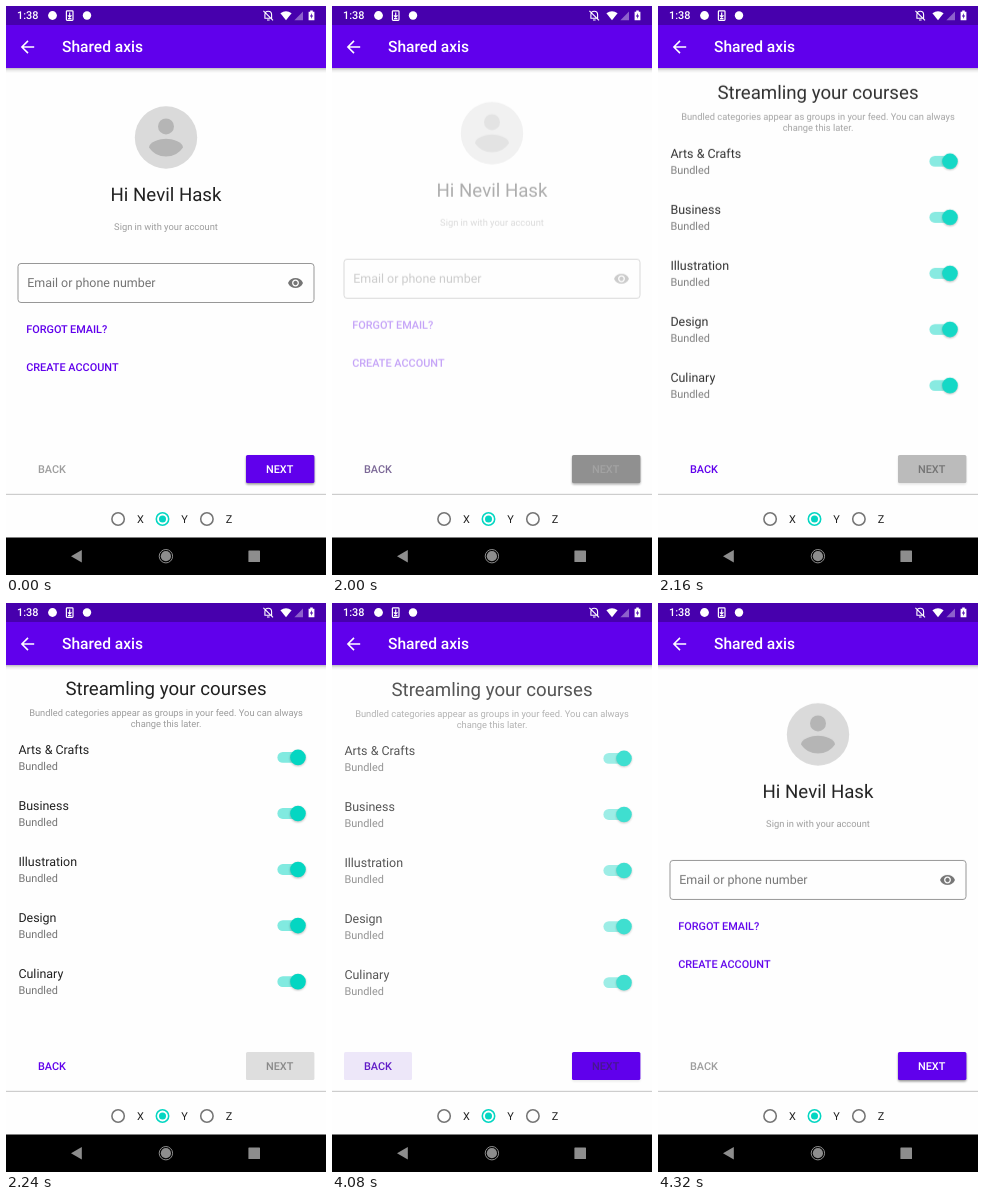
Recreate the animation shown at these times as an HTML page. Size 320 by 569 pixels, loop 4360 ms.

```html
<!DOCTYPE html>
<html lang="en">
<head>
<meta charset="utf-8">
<title>Shared axis transition</title>
<style>
  html, body { margin: 0; width: 100%; height: 100%; overflow: hidden; background: #fefefe; }
  svg { display: block; width: 100vw; height: 100vh; }
  text { font-family: Roboto, sans-serif; text-rendering: geometricPrecision; }
  .headline { font-size: 18.68px; fill: #212121; text-anchor: middle; }
  .caption { font-size: 9.34px; fill: #9c9c9c; text-anchor: middle; }
  .item { font-size: 12.46px; fill: #212121; }
  .sub { font-size: 10.9px; fill: #757575; }
  .button { font-size: 10.9px; font-weight: 500; }
  .link { fill: #6000ec; }
  .center { text-anchor: middle; }
</style>
</head>
<body>
<svg viewBox="0 0 320 569" preserveAspectRatio="none">
  <defs>
    <linearGradient id="barShade" x2="0" y2="1">
      <stop offset="0" stop-opacity=".26"/>
      <stop offset=".45" stop-opacity=".08"/>
      <stop offset="1" stop-opacity="0"/>
    </linearGradient>
    <filter id="soft" x="-20%" y="-40%" width="140%" height="180%"><feGaussianBlur stdDeviation="1.2"/></filter>
    <g id="toggle">
      <rect x="-20.6" y="-5.45" width="25.7" height="10.9" rx="5.45" fill="#04d6c2" opacity=".5"/>
      <circle cy=".9" r="7.8" opacity=".28" filter="url(#soft)"/>
      <circle r="7.8" fill="#04d6c2"/>
    </g>
  </defs>

  <rect width="320" height="569" fill="#fefefe"/>

  <g id="signIn">
    <circle cx="160" cy="131.5" r="31.2" fill="#dadada"/>
    <g fill="#b5b5b5">
      <circle cx="160" cy="120.4" r="8"/>
      <path d="M143 141.5C143 135.6 154 132.7 160 132.7S177 135.6 177 141.5Q171 150.6 160 150.6T143 141.5Z"/>
    </g>
    <text class="headline" x="160" y="195">Hi Nevil Hask</text>
    <text class="caption" x="160" y="223.6">Sign in with your account</text>
    <rect x="12" y="257.5" width="296" height="39" rx="3" fill="none" stroke="#979797"/>
    <text class="item" x="21.2" y="281.3" style="fill:#757575">Email or phone number</text>
    <g transform="translate(289.5 277)" fill="none" stroke="#757575">
      <path d="M-7.5 0C-5 -6.8 5 -6.8 7.5 0C5 6.8 -5 6.8 -7.5 0Z" fill="#757575" stroke="none"/>
      <circle r="2.8" stroke="#fefefe" stroke-width="1.3"/>
    </g>
    <text class="button link" x="20.2" y="327.3">FORGOT EMAIL?</text>
    <text class="button link" x="20.2" y="364.7">CREATE ACCOUNT</text>
  </g>

  <g id="courses">
    <text class="headline" x="160" y="92.2">Streamling your courses</text>
    <text class="caption" x="160" y="112.8">Bundled categories appear as groups in your feed. You can always</text>
    <text class="caption" x="160" y="123.8">change this later.</text>
  </g>

  <rect id="backInk" x="12" y="449" width="68" height="28" rx="1.6" fill="#5a1ec8"/>
  <text id="back" class="button center" x="45.9" y="467.2">BACK</text>
  <rect id="nextShade" x="240" y="450.4" width="68.4" height="28" rx="1.6" filter="url(#soft)"/>
  <rect id="nextFill" x="240" y="449" width="68.4" height="28" rx="1.6"/>
  <rect id="nextInk" x="240" y="449" width="68.4" height="28" rx="1.6" fill="#fff"/>
  <text id="next" class="button center" x="273.6" y="467.2">NEXT</text>

  <rect y="487.8" width="320" height="1.2" fill="#cdcdcd"/>
  <g id="axes"></g>

  <rect y="62" width="320" height="5" fill="url(#barShade)"/>
  <rect width="320" height="62" fill="#6000ec"/>
  <rect width="320" height="19" fill="#4700ad"/>
  <path d="M28.2 41H16.6M22 34.9L15.9 41L22 47.1" fill="none" stroke="#fff" stroke-width="1.55"/>
  <text x="56" y="46.4" font-size="15.57" font-weight="500" fill="#fff">Shared axis</text>

  <g fill="#fff">
    <text x="11" y="13.4" font-size="10.9" font-weight="500">1:38</text>
    <circle cx="46.5" cy="9.5" r="4.4"/>
    <circle cx="81" cy="9.5" r="4.2"/>
    <g fill="none" stroke="#fff" stroke-width="1.2">
      <rect x="60.4" y="4.8" width="6.6" height="9.6" rx=".8"/>
      <path d="M63.7 6.6V11M61.9 9.4L63.7 11.2L65.5 9.4M62 12.7H65.4"/>
      <path d="M258.9 12.2H265.6V8.8C265.6 4 258.9 4 258.9 8.8ZM261 14H263.6M257.4 4.8L267 14.4" stroke-width="1.1"/>
    </g>
    <path d="M274.4 7.2Q280 3.2 285.6 7.2L280 14.2Z"/>
    <path d="M288.4 14.2L297 5.4V14.2Z" opacity=".38"/>
    <path d="M302.6 5.7H304.2V4.6H306.8V5.7H308.4V14.3H302.6Z"/>
    <path d="M306 7L303.9 10.4H305.3L305 13L307.1 9.6H305.7Z" fill="#4700ad"/>
  </g>

  <rect y="531.5" width="320" height="37.5"/>
  <g fill="#8d8d8d">
    <path d="M65 550.2L75.8 544V556.4Z"/>
    <circle cx="159.9" cy="550.2" r="5.1"/>
    <circle cx="159.9" cy="550.2" r="6.7" fill="none" stroke="#8d8d8d" stroke-width="1"/>
    <rect x="242.4" y="544.4" width="11.6" height="11.6" rx=".6"/>
  </g>
</svg>
<script>
const LOOP = 4360, STEP = 40, SHIFT = 23.36;
const FORWARD = 1932, BACKWARD = 4043, DURATION = 300, TEXT_FADE = 200;
const $ = id => document.getElementById(id);
const clamp = v => Math.min(1, Math.max(0, v));

$('courses').innerHTML += ['Arts &amp; Crafts', 'Business', 'Illustration', 'Design', 'Culinary']
  .map((name, i) => `<g transform="translate(0 ${i * 56.06})">
    <text class="item" x="12.4" y="151.2">${name}</text>
    <text class="sub" x="12.4" y="166.5">Bundled</text>
    <use href="#toggle" x="292" y="154.4"/></g>`).join('');

$('axes').innerHTML = ['X', 'Y', 'Z'].map((name, i) => {
  const x = 112.1 + i * 44.4, on = name === 'Y', color = on ? '#04d6c2' : '#757575';
  return `<circle cx="${x}" cy="513" r="6.2" fill="none" stroke="${color}" stroke-width="1.56"/>
    ${on ? `<circle cx="${x}" cy="513" r="3.5" fill="${color}"/>` : ''}
    <text x="${x + 18.8}" y="516.9" font-size="10.9" fill="#212121">${name}</text>`;
}).join('');

// Cubic Bezier easing, solved for x by bisection
function bezier(x1, y1, x2, y2) {
  const at = (s, a, b) => 3 * (1 - s) ** 2 * s * a + 3 * (1 - s) * s * s * b + s ** 3;
  return value => {
    const x = clamp(value);
    if (x === 0 || x === 1) return x;
    let low = 0, high = 1;
    for (let i = 0; i < 24; i++) {
      const mid = (low + high) / 2;
      if (at(mid, x1, x2) < x) low = mid; else high = mid;
    }
    return at(low, y1, y2);
  };
}
const standard = bezier(.4, 0, .2, 1);
const accelerate = bezier(.4, 0, 1, 1);
const decelerate = bezier(0, 0, .2, 1);

const PURPLE = [96, 0, 236, 1], WHITE = [255, 255, 255, 1], DISABLED = [0, 0, 0, .38];
const mix = (a, b, p) => `rgba(${a.map((v, i) => v + (b[i] - v) * p).join()})`;

function place(id, y, opacity) {
  $(id).setAttribute('transform', `translate(0 ${y.toFixed(3)})`);
  $(id).setAttribute('opacity', opacity);
}

function swap(leaving, entering, p, direction) {
  const moved = standard(p);
  place(leaving, -direction * SHIFT * moved, 1 - accelerate(p / .3));
  place(entering, direction * SHIFT * (1 - moved), decelerate((p - .3) / .7));
}

// Press highlight: rises until the release, then fades
const ink = (t, press, release, fade) =>
  t < release ? clamp((t - press) / (release - press)) : 1 - clamp((t - release) / fade);

function draw(t) {
  const returning = t >= BACKWARD;
  const start = returning ? BACKWARD : FORWARD;
  const p = clamp((t - start) / DURATION), fade = clamp((t - start) / TEXT_FADE);
  if (returning) swap('courses', 'signIn', p, -1);
  else swap('signIn', 'courses', p, 1);

  const enabled = returning || t < FORWARD;
  const gray = 140 + 82 * p * p;
  $('nextFill').setAttribute('fill', enabled ? mix(PURPLE, PURPLE, 0) : `rgb(${gray},${gray},${gray})`);
  $('nextShade').setAttribute('opacity', .42 * (returning ? fade : 1 - p));
  $('nextInk').setAttribute('opacity', enabled && !returning ? .12 * ink(t, 1840, FORWARD, 1) : 0);
  $('backInk').setAttribute('opacity', .12 * ink(t, 3960, BACKWARD, 250));

  $('next').setAttribute('fill', returning ? mix(DISABLED, WHITE, fade) : mix(WHITE, DISABLED, fade));
  $('back').setAttribute('fill', returning ? mix(PURPLE, DISABLED, fade) : mix(DISABLED, PURPLE, fade));
}

const origin = performance.now();
function tick() {
  const t = (performance.now() - origin) % LOOP;
  draw(Math.floor(t / STEP) * STEP);
  requestAnimationFrame(tick);
}
tick();
</script>
</body>
</html>
```
